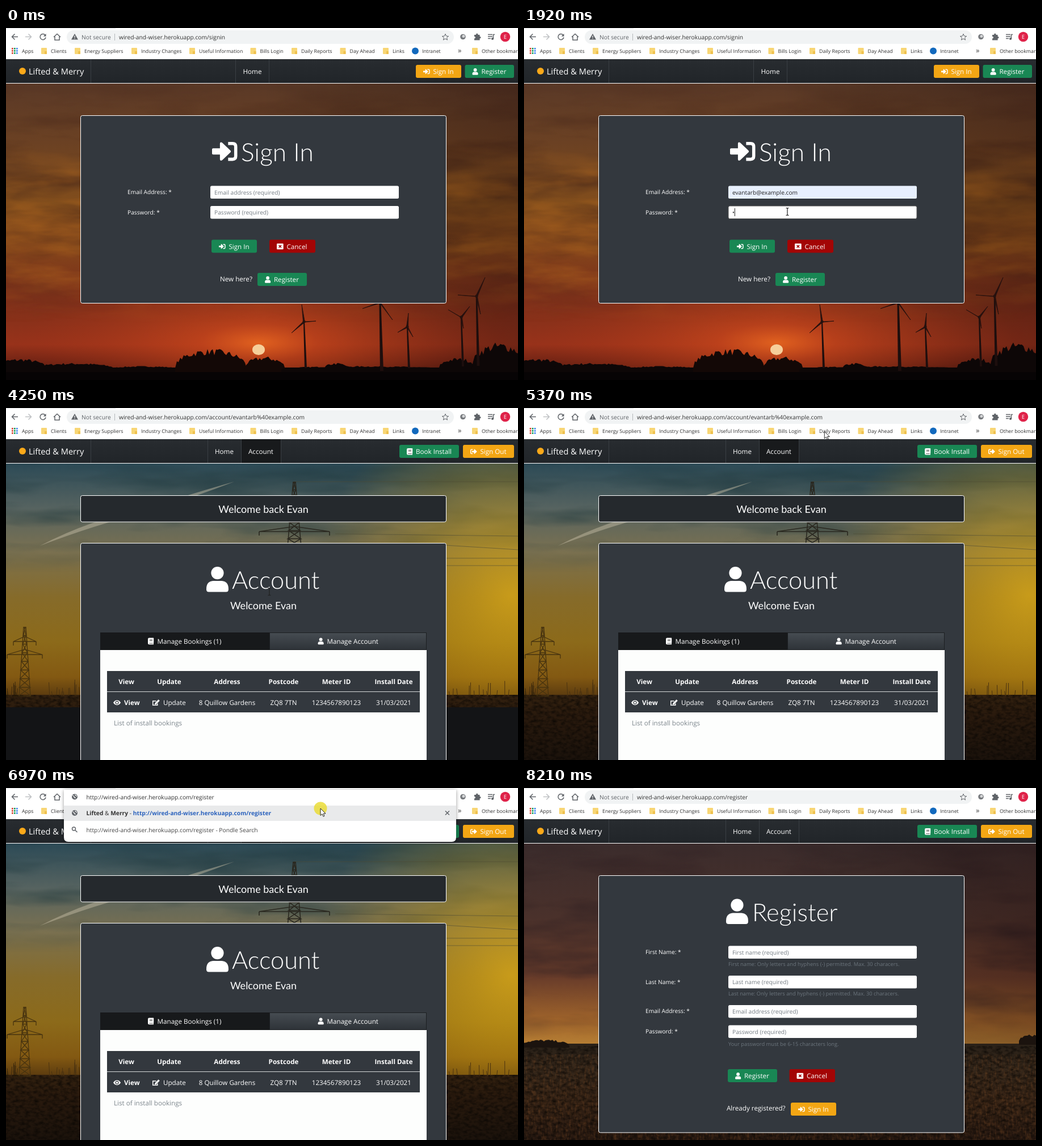
Recreate the animation shown at these times as an HTML page. Size 902 px wide and 621 px high, loop 9.17 s.

```html
<!DOCTYPE html>
<html lang="en">
<head>
<meta charset="utf-8">
<title>Sign in and register</title>
<style>
html, body { margin: 0; width: 100%; height: 100%; overflow: hidden; background: #131416; }
svg { display: block; }
text { font-family: 'Open Sans', 'Noto Sans', sans-serif; white-space: pre; text-rendering: geometricPrecision; }
.thin { font-family: Lato, 'Open Sans', sans-serif; }
.bold { font-weight: 700; }
.mid { text-anchor: middle; }
</style>
</head>
<body>
<svg id="stage" width="902" height="621" viewBox="0 0 902 621"></svg>
<script>
const LOOP = 9170, STEP = 80;
const GREEN = '#198754', AMBER = '#f3a614', RED = '#a30505', GREY = '#747c83', CARD = '#33383e';
const HOST = 'wired-and-wiser.herokuapp.com';
const BRAND = 'Lifted &amp; Merry';
const MAIL = 'evantarb@example.com';

let seed = 7;
const rnd = () => (seed = seed * 16807 % 2147483647) / 2147483647;

// Drawing helpers
const rect = (x, y, w, h, fill, more = '') =>
  `<rect x="${x}" y="${y}" width="${w}" height="${h}" fill="${fill}" ${more}/>`;
const line = (x1, y1, x2, y2, color, w = 1) =>
  `<path d="M${x1} ${y1}L${x2} ${y2}" stroke="${color}" stroke-width="${w}" fill="none"/>`;
const text = (x, y, s, size = 10.2, fill = '#fff', more = '') =>
  `<text x="${x}" y="${y}" font-size="${size}" fill="${fill}" ${more}>${s}</text>`;
const path = (d, fill, more = '') => `<path d="${d}" fill="${fill}" ${more}/>`;
const group = (id, body, more = '') => `<g id="${id}" ${more}>${body}</g>`;
const fade = (id, stops, more = 'x2="0" y2="1"', kind = 'linear') =>
  `<${kind}Gradient id="${id}" ${more}>` + stops.map(([o, c, a = 1]) =>
    `<stop offset="${o}" stop-color="${c}" stop-opacity="${a}"/>`).join('') + `</${kind}Gradient>`;
const noise = (id, freq, n, [r, g, b], gain, bias) =>
  `<filter id="${id}" x="0" y="0" width="1" height="1" color-interpolation-filters="sRGB">
  <feTurbulence type="fractalNoise" baseFrequency="${freq}" numOctaves="4" seed="${n}"/>
  <feColorMatrix values="0 0 0 0 ${r} 0 0 0 0 ${g} 0 0 0 0 ${b} ${gain} 0 0 0 ${bias}"/></filter>`;

// Icons on a grid 16 units high
const icons = {
  enter: [16, `<path d="M.7 6h4.3V3q.2-1.3 1.5-.5l5.2 5q.5.5 0 1l-5.2 5q-1.3.8-1.5-.5v-3H.7Q0 10 0 9.3V6.7Q0 6 .7 6z"/>
    <path d="M10.2 3h2.8q2 0 2 2v6q0 2-2 2h-2.8" fill="none" stroke="#fff" stroke-width="2"/>`],
  leave: [16, `<path d="M4.7 6H9V3q.2-1.3 1.5-.5l5.2 5q.5.5 0 1l-5.2 5Q9.2 14.3 9 13v-3H4.7Q4 10 4 9.3V6.7Q4 6 4.7 6z"/>
    <path d="M5.8 3H3q-2 0-2 2v6q0 2 2 2h2.8" fill="none" stroke="#fff" stroke-width="2"/>`],
  user: [14, `<circle cx="7" cy="4" r="4"/><path d="M4.2 9h5.6q4.2.4 4.2 5v.5q0 1.5-1.5 1.5h-11Q0 16 0 14.5V14q0-4.6 4.2-5z"/>`],
  close: [16, `<rect y="1" width="16" height="14" rx="1.6"/><path d="M5 5l6 6M11 5l-6 6" stroke="${RED}" stroke-width="2.2"/>`],
  book: [14, `<path d="M3 0h10q1 0 1 1v10.5q0 .6-.5 1v2.3q.5.2.5.7t-.8.5H3q-3 0-3-3V3q0-3 3-3z"/>
    <path d="M4 4.5h7M4 7h7M3 13.2h9" stroke="#222" stroke-width="1"/>`],
  eye: [18, `<path d="M0 8q3.5-6 9-6t9 6q-3.5 6-9 6T0 8z"/><circle cx="9" cy="8" r="4.2" fill="${CARD}"/><circle cx="9" cy="8" r="2.6"/>`],
  edit: [18, `<path d="M12 10v4H1V4h8" fill="none" stroke="#fff" stroke-width="2"/><path d="M6 9l8.5-8.5 3 3L9 12l-3.5.5z"/>`]
};
const icon = (name, x, y, k = .73) =>
  `<g fill="#fff" transform="translate(${x} ${y}) scale(${k})">${icons[name][1]}</g>`;
const button = (x, y, w, color, name, label) => rect(x, y, w, 23, color, 'rx="3"') +
  icon(name, x + 13, y + 6) + text(x + 18.7 + icons[name][0] * .73, y + 16, label, 11.65);
const input = (y, hint, id = '') => rect(360, y, 332, 22.5, '#fff', `rx="2.5" ${id && `id="${id}Box"`}`) +
  text(367, y + 15, hint, 10.2, GREY, id && `id="${id}"`);
const card = (y, h, fill = CARD) => rect(131.5, y, 644, h, fill, 'rx="3" stroke="#fff"');
const heading = (name, x, y, s, tx, size) =>
  icon(name, x, y, 2.78) + text(tx, y + 39, s, size, '#fff', 'class="thin" font-weight="300"');

// Scenery
const sky = fill => rect(0, 98, 902, 523, fill);
const cloud = (id, y, h) => rect(0, y, 902, h, '#000', `filter="url(#${id})" mask="url(#soft)"`);
function ridge(a, b, base, h, color, foot = 621) {
  let d = `M${a} ${foot}L${a} ${base}`;
  for (let x = a; x <= b; x += 3) {
    const u = (x - a) / (b - a);
    d += `L${x} ${(base - h * Math.pow(Math.sin(Math.PI * u), .4) * (.75 + .4 * rnd())).toFixed(1)}`;
  }
  return path(d + `L${b} ${foot}z`, color);
}
const turbine = (x, y, foot, w, tips) =>
  path(`M${x - w / 4} ${y}h${w / 2}L${x + 3 + w / 2} ${foot}h${-w}z`, '#1d0e0d') +
  tips.map(([dx, dy]) => path(`M${x - 1.5} ${y}L${x + dx} ${y + dy}L${x + 1.5} ${y + 1}z`, '#26110e', 'stroke="#26110e" stroke-width=".8"')).join('') +
  `<circle cx="${x}" cy="${y}" r="2.5" fill="#26110e"/>`;
function pylon(x, y, h, w, arms, color, lw) {
  let d = `M${x - 2} ${y}L${x - w / 2} ${y + h}M${x + 2} ${y}L${x + w / 2} ${y + h}`;
  for (let i = 0; i < 8; i++) {
    const a = w / 2 * i / 8 + 1, b = w / 2 * (i + 1) / 8 + 1, p = y + h * i / 8, q = p + h / 8;
    d += `M${x - a} ${p}L${x + b} ${q}L${x - b} ${q}L${x + a} ${p}`;
  }
  for (const [ay, r] of arms) d += `M${x - r} ${ay + 5}L${x} ${ay - 4}L${x + r} ${ay + 5}zM${x - r} ${ay + 5}v7M${x + r} ${ay + 5}v7`;
  return `<path d="${d}" fill="none" stroke="${color}" stroke-width="${lw}"/>`;
}
function grass(a, b, y, color) {
  let s = '';
  for (let i = 0; i < 14; i++) {
    const x = a + (b - a) * rnd();
    s += line(x, y, x + 4 * rnd() - 2, y - 8 - 28 * rnd() * rnd(), color);
  }
  return s;
}

const defs = `<defs>
${fade('dusk', [[0, '#5a3927'], [.2, '#6b4123'], [.4, '#814d1c'], [.55, '#85471b'], [.66, '#7d351a'], [.76, '#83301a'], [.88, '#98321a'], [.95, '#6a2113'], [1, '#2a0d09']])}
${fade('ember', [[0, '#ee6a20', .85], [.25, '#d84c1c', .55], [1, '#a83418', 0]], '', 'radial')}
${fade('shade', [[0, '#000', 0], [.5, '#000', 0], [1, '#1a0808', .3]], '')}
${fade('dawn', [[0, '#2c4a56'], [.15, '#566360'], [.3, '#7b7150'], [.45, '#866b2a'], [.6, '#8c6a1a'], [.72, '#835912'], [.785, '#5a3a0f']])}
${fade('earth', [[0, '#33210f'], [.3, '#2a1a0d'], [1, '#1b120b']])}
${fade('sun', [[0, '#d8a716', .8], [.5, '#c4940f', .4], [1, '#b08010', 0]], 'gradientUnits="userSpaceOnUse" cx="890" cy="330" r="350"', 'radial')}
${fade('eve', [[0, '#3b2c2c'], [.25, '#4a312b'], [.45, '#683c2a'], [.6, '#a0642b'], [.67, '#b47c33']])}
${fade('crop', [[0, '#2a2118'], [.25, '#33261a'], [.6, '#362315'], [1, '#251710']])}
${fade('tab', [[0, '#464c52'], [1, '#2e3338']])}
${fade('bar', [[0, '#282c30'], [1, '#212529']])}
${fade('softFill', [[0, '#000'], [.3, '#fff'], [.7, '#fff'], [1, '#000']])}
<mask id="soft" maskContentUnits="objectBoundingBox"><rect width="1" height="1" fill="url(#softFill)"/></mask>
${noise('glint', '.007 .03', 4, [.72, .42, .12], 1.4, -.6)}
${noise('murk', '.006 .025', 9, [.25, .13, .09], 1.2, -.5)}
${noise('haze', '.004 .02', 5, [.1, .2, .22], 1.3, -.55)}
${noise('gloom', '.006 .025', 12, [.18, .12, .13], 1.4, -.55)}
${noise('straw', '.3 .09', 3, [.42, .25, .12], 1.2, -.5)}
${noise('soil', '.12 .2', 6, [.03, .02, .01], 1.4, -.5)}
<clipPath id="loadB"><rect id="cutB" width="902" height="0"/></clipPath>
<clipPath id="loadC"><rect id="cutC" width="902" height="0"/></clipPath>
<clipPath id="edge"><rect width="902" height="621"/></clipPath>
</defs>`;

const INK = '#0d0707';
const sunset = sky('url(#dusk)') + cloud('murk', 60, 460) + cloud('glint', 200, 320) +
  sky('url(#shade)') + rect(25, 420, 840, 270, 'url(#ember)') +
  `<ellipse cx="445" cy="567.5" rx="11" ry="9.5" fill="#f6cf9a"/>` + rect(0, 599, 902, 22, INK) +
  ridge(-20, 70, 600, 15, INK) + ridge(50, 190, 601, 9, INK) + ridge(180, 305, 602, 5, INK) +
  ridge(298, 424, 600, 30, '#130806') + ridge(420, 492, 602, 20, '#130806') +
  ridge(485, 770, 602, 5, INK) + ridge(560, 604, 602, 10, INK) + ridge(762, 830, 602, 18, INK) + ridge(820, 920, 602, 42, INK) +
  turbine(525, 518, 600, 4, [[-4, -30], [21, -1], [-22, 20]]) +
  turbine(659, 484, 605, 6, [[-31, 11], [22, 31], [12, -30]]) +
  turbine(707, 527, 600, 4, [[2, -24], [-17, 10], [10, 18]]) +
  turbine(802, 510, 597, 4, [[-23, -13], [15, -19], [4, 20]]) +
  turbine(829, 473, 596, 5, [[-33, -2], [15, -33], [7, 32]]) + rect(0, 607, 902, 14, '#070405');

const fields = sky('url(#dawn)') + cloud('haze', 60, 230) + sky('url(#sun)') + rect(0, 506, 902, 115, 'url(#earth)') +
  path('M60 243Q150 196 240 180Q330 150 402 130Q330 158 240 186Q160 205 60 243z', '#c9c2a8', 'opacity=".45"') +
  path('M508 130H902M580 222L902 226M776 265H902M776 278H902M740 240L902 250', 'none', 'stroke="#4d4a35" opacity=".6"') +
  pylon(508, 130, 115, 24, [[213, 62]], '#2a2820', 1.6) +
  pylon(33, 386, 122, 20, [[407, 20], [430, 31]], '#47330f', 1.3) +
  grass(0, 20, 510, '#3b280c') + grass(75, 130, 508, '#4b3310') + grass(776, 902, 508, '#4b3310') +
  rect(0, 506, 902, 115, '#000', 'filter="url(#soil)"');

const wheat = sky('url(#eve)') + cloud('gloom', 40, 420) + sky('url(#shade)') +
  rect(0, 451, 902, 170, 'url(#crop)') + rect(0, 470, 902, 151, '#000', 'filter="url(#straw)"') +
  rect(0, 455, 902, 166, '#000', 'filter="url(#soil)"') +
  ridge(-10, 80, 455, 10, '#1b130e', 458) + ridge(872, 920, 446, 10, '#1b130e', 453);

// Pages
const nav = (body, marks) => rect(0, 55, 902, 42, 'url(#bar)') + marks.map(x => line(x, 55, x, 97, '#3a3f44')).join('') +
  line(0, 97.5, 902, 97.5, '#fff') + '<circle cx="29" cy="76" r="6" fill="#fba919"/>' + text(40, 81.5, BRAND, 14.6) + body;

const signIn = sunset + nav(text(417.5, 81, 'Home', 11.65) +
    button(722, 65, 80, AMBER, 'enter', 'Sign In') + button(808.5, 65, 86.5, GREEN, 'user', 'Register'), [149.5, 404.5, 463.5]) +
  card(154.5, 331) + heading('enter', 363, 195.5, 'Sign In', 414, 44.3) +
  text(214, 293, 'Email Address: *') + text(214, 328.5, 'Password: *') +
  input(278.5, 'Email address (required)', 'mail') + input(314, 'Password (required)', 'pass') +
  button(362, 373.5, 80, GREEN, 'enter', 'Sign In') + button(464, 373.5, 81, RED, 'close', 'Cancel') +
  text(377, 447, 'New here?', 11.65) + button(443, 432, 87, GREEN, 'user', 'Register') +
  rect(0, 318, 1, 14, '#222', 'id="passCaret"') +
  group('list', rect(360, 302.5, 333, 179, '#fff', 'rx="2"') + rect(360, 308, 333, 28, '#c8c8c8', 'id="pick"') +
    [MAIL, 'evantarb1@example.com', 'me@example.com', 'evantarb2@example.com', 'evantarb3@example.com', 'etarb@field.example.com']
      .map((s, i) => text(369, 326 + 28 * i, s, 9.8, '#222')).join(''));

const signedNav = active => nav((active ? rect(415, 55, 69, 42, '#181a1c') : '') +
  text(368, 81, 'Home', 11.65) + text(427, 81, 'Account', 11.65) +
  button(693, 65, 105, GREEN, 'book', 'Book Install') + button(805, 65, 90, AMBER, 'leave', 'Sign Out'), [149.5, 355.5, 414.5, 484.5]);

const columns = [[212, 'View'], [287.5, 'Update'], [389.5, 'Address', '8 Quillow Gardens'],
  [489, 'Postcode', 'ZQ8 7TN'], [582, 'Meter ID', '1234567890123'], [683, 'Install Date', '31/03/2021']];
const account = sky('#131416') + group('', fields, 'clip-path="url(#loadB)"') + signedNav(true) +
  card(154.5, 46.5, '#25292d') + text(453.5, 185, 'Welcome back Evan', 18, '#fff', 'class="thin mid"') +
  card(238.5, 400) + heading('user', 353, 280, 'Account', 398, 43.4) +
  text(453.5, 355, 'Welcome Evan', 18, '#fff', 'class="thin mid"') +
  rect(166, 396, 298, 31, '#17191b') + rect(464.5, 396.5, 276, 30, 'url(#tab)', 'stroke="#1c1f22"') +
  icon('book', 250, 405.5) + text(266.5, 416, 'Manage Bookings (1)', 11.65) +
  icon('user', 549.5, 405.5) + text(565.5, 416, 'Manage Account', 11.65) +
  rect(166, 427, 575, 194, '#fdfefd') + rect(178, 464, 551, 73, CARD) + line(178, 500.5, 729, 500.5, '#d5d8da') +
  columns.map(([x, head, cell = '']) => text(x, 487, head, 11.65, '#fff', 'class="mid bold"') +
    text(x, 524, cell, 11.65, '#fff', 'class="mid"')).join('') +
  icon('eye', 189, 514) + text(208, 524, 'View', 11.65, '#fff', 'class="bold"') +
  icon('edit', 258, 514) + text(277, 524, 'Update', 11.65) + text(190, 560, 'List of install bookings', 11.65, '#7c858c');

const rule = 'name: Only letters and hyphens (-) permitted. Max. 30 characers.';
const hint = (y, s) => text(360, y, s, 9.3, '#6c757d');
const register = sky('#131416') + group('', wheat, 'clip-path="url(#loadC)"') + signedNav(false) +
  card(154.5, 453.5) + heading('user', 356, 195.5, 'Register', 402, 43.4) +
  [[293, 'First Name: *'], [345.5, 'Last Name: *'], [397, 'Email Address: *'], [433, 'Password: *']].map(r => text(214, ...r)).join('') +
  input(278.5, 'First name (required)') + hint(314, 'First ' + rule) + input(331, 'Last name (required)') + hint(366, 'Last ' + rule) +
  input(383, 'Email address (required)') + input(418.5, 'Password (required)') + hint(454.5, 'Your password must be 6-15 characters long.') +
  button(359, 496, 87, GREEN, 'user', 'Register') + button(467.5, 496, 80.5, RED, 'close', 'Cancel') +
  text(357, 569, 'Already registered?', 11.65) + button(470, 555, 80, AMBER, 'enter', 'Sign In');

// Browser chrome
const pen = (d, color = '#5f6368', w = 1.5) => path(d, 'none', `stroke="${color}" stroke-width="${w}"`);
const folder = x => path(`M${x} 36q0-1 1-1h8q1 0 1 1v9q0 1-1 1h-8q-1 0-1-1z`, '#f8d675') + rect(x + 6, 41, 4, 5, '#efc14f');
const globe = y => `<circle cx="121" cy="${y}" r="5" fill="#5f6368"/>` +
  pen(`M117 ${y - 2}q3 0 3 2t3 2M122 ${y - 4}q0 2 3 3`, '#fff', 1.2);
const marks = [[62, 'Clients'], [121, 'Energy Suppliers'], [221, 'Industry Changes'], [323, 'Useful Information'], [430.5, 'Bills Login'],
  [503, 'Daily Reports'], [588.5, 'Day Ahead'], [664, 'Links'], [821, 'Other bookmarks']];
const dots = ['#db4437', '#0f9d58', '#4285f4', '#f4b400'];
let apps = '';
for (let i = 0; i < 9; i++) apps += rect(10 + i % 3 * 4, 35 + (i / 3 | 0) * 4, 2.7, 2.7, dots[(i + (i / 3 | 0)) % 4]);

const browser = rect(0, 0, 902, 55, '#fff') + line(0, .2, 193, .2, '#d5d7da') +
  pen('M21 15.5H10.5M15.5 10.5l-5 5 5 5') + pen('M34 15.5h10.5M39.5 10.5l5 5-5 5', '#bfc1c4') +
  group('reload', pen('M69 12.5a5 5 0 1 0 1 4') + path('M70.5 10v4.8h-4.8z', '#5f6368')) +
  group('stop', pen('M60.5 11l9 9M69.5 11l-9 9')) +
  pen('M84 16l6-5.5 6 5.5M86 15v6.2h8V15') +
  rect(107, 4, 682, 24, '#f1f3f4', 'rx="12" id="pill"') +
  path('M121 10l6 10.5h-12z', '#5f6368') + rect(120.4, 13.5, 1.2, 3.5, '#fff') + rect(120.4, 18, 1.2, 1.2, '#fff') +
  text(133, 19.5, 'Not secure', 10.25, '#5f6368') + rect(198, 7, 329, 17, '#3478d8', 'id="selected"') +
  group('address', rect(183.5, 6, 8, 20, '#f1f3f4', 'id="trim"') + line(191.5, 10, 191.5, 22, '#b5b8bc') +
    text(199, 19.5, '', 10.25, '#333', 'id="url"')) +
  path('M774 10.5l1.6 3.7 4 .3-3 2.6.9 4-3.5-2.2-3.5 2.2.9-4-3-2.6 4-.3z', 'none', 'stroke="#5f6368"') +
  '<circle cx="805" cy="15.5" r="4.8" fill="#777a7e"/><circle cx="806" cy="14.5" r="2.5" fill="#d5d6d8"/>' +
  path('M825 12h3q0-2.5 1.8-2.5t1.8 2.5h3v3q2 0 2 1.7t-2 1.7v3h-9.6v-3q2 0 2-1.7t-2-1.7z', '#5f6368') +
  pen('M849 11.5h8M849 15h8M849 18.5h5M858.5 11.5v8M858 11.5h3') + '<circle cx="857" cy="19" r="2" fill="#5f6368"/>' +
  '<circle cx="879.5" cy="15.5" r="8.7" fill="#df2249"/>' + text(879.5, 19, 'E', 9.5, '#fff', 'class="mid"') +
  apps + text(28, 43.5, 'Apps', 8.8, '#333') +
  marks.map(([x, s]) => folder(x) + text(x + 17, 43.5, s, 8.8, '#333')).join('') +
  '<circle cx="721" cy="40.5" r="6" fill="#1269bd"/>' + text(733, 43.5, 'Intranet', 8.8, '#333') + text(796, 44, '»', 13, '#444');

const typed = 'http://' + HOST + '/register';
const popup = path('M102 3h691v84q0 8-8 8h-675q-8 0-8-8z', '#fff', 'id="sheet" style="filter:drop-shadow(0 1px 3px #0006)"') +
  rect(102, 31, 691, 27, '#e4e5e7', 'opacity=".8"') +
  globe(15.5) + text(141.5, 19.5, typed, 10.25, '#333') + rect(367.5, 7, 1, 15, '#222', 'id="urlCaret"') +
  globe(44) + text(141.5, 48, `<tspan class="bold">Lifted</tspan> &amp; <tspan class="bold">Merry</tspan> - <tspan class="bold" fill="#2b62bd">${typed}</tspan>`, 10.25, '#333') +
  pen('M774 40.5l7 7M781 40.5l-7 7') + '<circle cx="119.5" cy="72" r="3" fill="none" stroke="#5f6368" stroke-width="1.4"/>' + pen('M122 74.5l3.5 3.5') +
  text(141.5, 77.5, typed + ' - Pondle Search', 10.25, '#444');

const pointer = '<circle id="press" r="11.5" fill="#eadb2c" opacity=".8"/>' +
  path('M0 0V12.5L3 9.8 5 14.3 7 13.4 5.1 9.1H9z', '#fff', 'id="arrow" stroke="#111" stroke-width=".9"') +
  group('beam', pen('M-2.5-6.5Q0-6.5 0-5V5.5Q0 6.5-2.5 6.5M2.5-6.5Q0-6.5 0-5M2.5 6.5Q0 6.5 0 5', '#222', 1.2));

document.getElementById('stage').innerHTML = defs + group('', group('signIn', signIn) + group('account', account) +
  group('register', register) + browser + group('popup', popup) + group('pointer', pointer), 'clip-path="url(#edge)"');

// Timeline
const el = id => document.getElementById(id);
const show = (id, on) => { el(id).style.display = on ? '' : 'none'; };
const set = (id, attrs) => { for (const k in attrs) el(id).setAttribute(k, attrs[k]); };
const within = (t, a, b) => t >= a && t < b;
const held = (rows, t) => rows.reduce((v, [at, x]) => t >= at ? x : v, rows[0][1]);

// Pointer strokes: start, end, easing, then start, bend and end points
const settle = f => f * (2 - f), smooth = f => f * f * (3 - 2 * f);
const strokes = [
  [70, 630, settle, [699, 505], [560, 330], [465, 291]],
  [730, 970, smooth, [465, 291], [463, 302], [462, 313]],
  [1050, 1290, smooth, [462, 313], [463, 318], [464, 324]],
  [4660, 5460, smooth, [464, 324], [470, 130], [544, 17]],
  [5990, 6390, smooth, [544, 17], [548, 28], [554, 36]],
  [7450, 7610, smooth, [554, 36], [555, 38], [555, 40]],
  [7730, 8130, smooth, [555, 40], [400, 330], [792, 610]]
];
const shapes = [[0, ''], [70, 'arrow'], [470, 'beam'], [810, 'arrow'], [1210, 'beam'], [3840, 'arrow'], [4170, 'beam'],
  [4820, 'arrow'], [5380, 'beam'], [6230, 'arrow'], [8210, '']];
const presses = [[630, 790], [970, 1050], [1280, 1440], [5610, 5760], [6970, 7060]];
const keys = [1920, 2220, 2370, 2540, 2630, 2780, 2870, 3050, 3300, 3610];
const loadB = [[0, 0], [4170, 330], [4250, 528], [4330, 621]];
const loadC = [[0, 0], [7140, 280], [7200, 460], [7270, 621]];

function place(t) {
  const [a, b, ease, p, q, r] = strokes.filter(s => t >= s[0]).pop() || strokes[0];
  const passed = Math.max(0, Math.floor((t - a) / STEP) * STEP);
  const f = ease(Math.min(1, passed / (b - a))), g = 1 - f;
  return p.map((v, i) => g * g * v + 2 * f * g * q[i] + f * f * r[i]);
}

function draw(t) {
  show('signIn', t < 4090);
  show('account', within(t, 4090, 7060));
  show('register', t >= 7060);
  set('cutB', { height: held(loadB, t) });
  set('cutC', { height: held(loadC, t) });

  const preview = within(t, 970, 1050), filled = t >= 970;
  el('mail').textContent = filled ? MAIL : 'Email address (required)';
  el('mail').style.fontFamily = preview ? "'Liberation Sans', sans-serif" : '';
  set('mail', { fill: filled ? '#222' : GREY });
  set('mailBox', { fill: filled ? '#e8f0fe' : '#fff', stroke: within(t, 630, 1280) ? '#555' : 'none' });
  show('list', within(t, 710, 1050));
  show('pick', t >= 880);

  const n = keys.filter(k => t >= k).length;
  el('pass').textContent = n ? '•'.repeat(n) : 'Password (required)';
  set('pass', { fill: n ? '#333' : GREY });
  set('passBox', { stroke: t >= 1280 ? '#555' : 'none' });
  set('passCaret', { x: 367 + n * 3.87 });
  show('passCaret', t >= 1280);

  const loading = within(t, 7060, 7270), busy = loading || within(t, 3840, 4170);
  show('stop', busy);
  show('reload', !busy);
  const picked = within(t, 5680, 5990), focus = within(t, 5610, 5990);
  el('url').textContent = HOST + (t < 4090 ? '/signin' : t < 7060 ? '/account/' + MAIL.replace('@', '%40') : '/register');
  set('url', { fill: picked ? '#fff' : '#333' });
  set('pill', { fill: focus ? '#fff' : '#f1f3f4', stroke: focus ? '#1a73e8' : 'none', 'stroke-width': 1.5 });
  set('address', { transform: `translate(${loading ? -3 : 0} 0)` });
  show('trim', loading);
  show('selected', picked);
  show('popup', within(t, 5990, 7060));
  set('sheet', { 'fill-opacity': Math.min(1, .82 + Math.max(0, t - 6070) / 900) });
  show('urlCaret', t < 6560);

  const shape = held(shapes, t), [x, y] = place(t);
  show('pointer', shape);
  show('arrow', shape === 'arrow');
  show('beam', shape === 'beam');
  show('press', presses.some(([a, b]) => within(t, a, b)));
  set('pointer', { transform: `translate(${x.toFixed(1)} ${y.toFixed(1)})` });
}

const start = performance.now();
function tick() {
  draw((performance.now() - start) % LOOP);
  requestAnimationFrame(tick);
}
tick();
</script>
</body>
</html>
```
